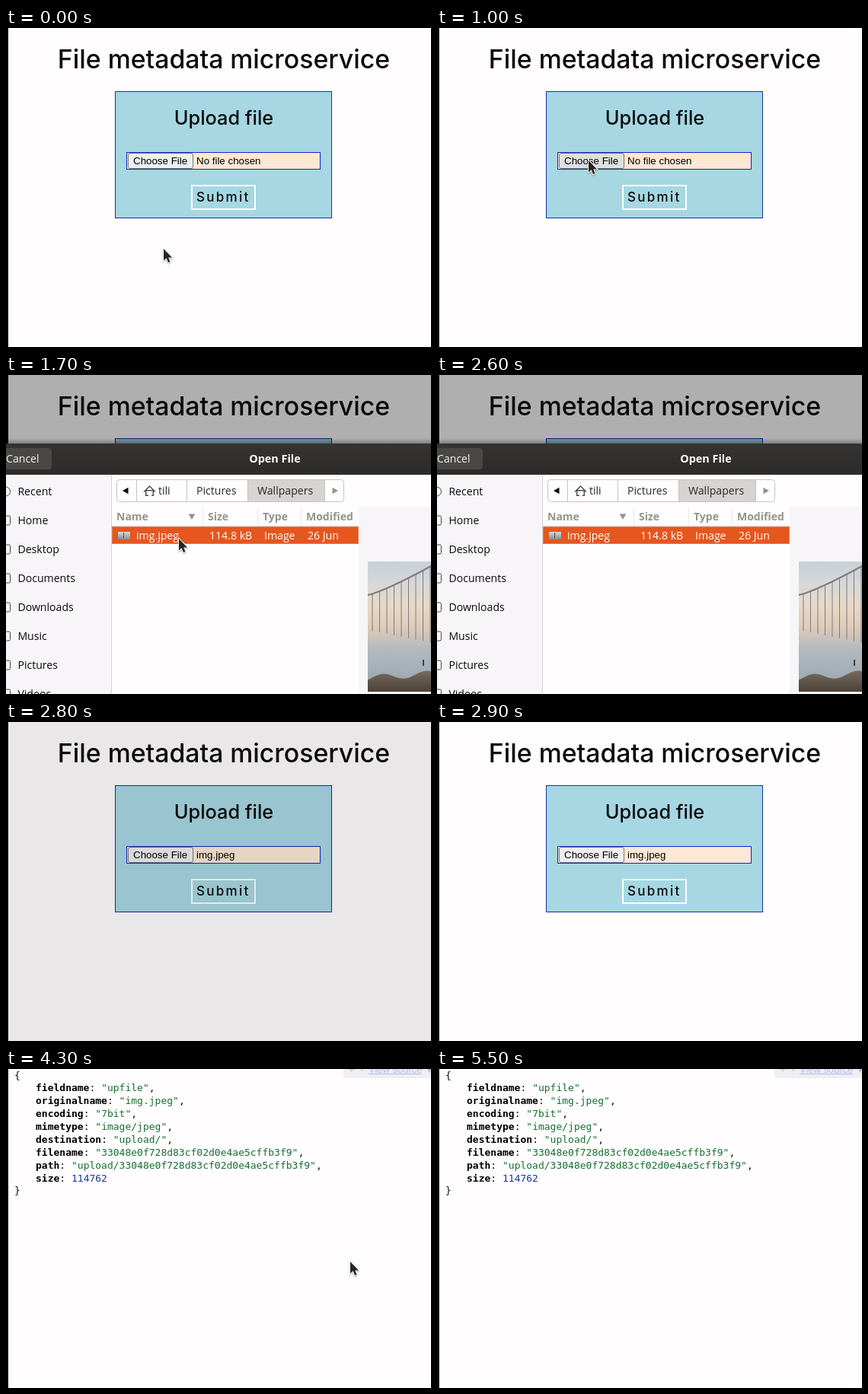
These frames come from a looping animation (558 by 419 pixels, 5.9 s). An HTML page with a canvas:

```html
<!DOCTYPE html>
<html lang="en">
<head>
<meta charset="utf-8">
<title>File metadata microservice</title>
<style>
html, body { margin: 0; width: 100%; height: 100%; overflow: hidden; background: #fffdfe; }
canvas { display: block; width: 558px; height: 419px; }
</style>
</head>
<body>
<canvas id="stage" width="558" height="419"></canvas>
<script>
const W = 558, H = 419, LOOP = 5900, STEP = 100;
const ctx = document.getElementById('stage').getContext('2d');
const PAPER = '#fffdfe', INK = '#0b0a0d', GREY = '#96928f', LINE = '#c9c3bf', ICON = '#4a4846';
const HEAD = 'Inter, sans-serif';
const UI = '"Open Sans", "Noto Sans", sans-serif';
const BODY = '500 14.1px ' + UI, BOLD = '700 14px ' + UI;
const ARIAL = '13.33px "Liberation Sans", Arial, sans-serif';
const MONO = '13px "DejaVu Sans Mono", monospace', CELL = 7.83;

// Pointer moves: start, end, x, y
const MOVES = [
  [100, 500, 192, 187], [600, 800, 199, 174], [1000, 1300, 219, 201],
  [1300, 1700, 227, 215], [1800, 2200, 570, 160], [2900, 3600, 319, 219],
  [3700, 4100, 452, 253], [4900, 5300, 100, 25]
];

const PLACES = ['Recent', 'Home', 'Desktop', 'Documents', 'Downloads', 'Music', 'Pictures', 'Videos'];
const COLUMNS = [
  [145, 'Name', 'img.jpeg'], [265, 'Size', '114.8 kB'],
  [337, 'Type', 'Image'], [394, 'Modified', '26 Jun']
];
const CRUMBS = [[171, 'tili'], [237, 'Pictures'], [317, 'Wallpapers'], [418, '']];

const HASH = '33048e0f728d83cf02d0e4ae5cffb3f9';
const RESULT = {
  fieldname: 'upfile', originalname: 'img.jpeg', encoding: '7bit', mimetype: 'image/jpeg',
  destination: 'upload/', filename: HASH, path: 'upload/' + HASH, size: 114762
};

const ramp = (t, a, b) => Math.min(1, Math.max(0, (t - a) / (b - a)));
const smooth = u => u * u * (3 - 2 * u);

function rect(x, y, w, h, fill) {
  ctx.fillStyle = fill;
  ctx.fillRect(x, y, w, h);
}

function frame(x, y, w, h, color, lw = 1) {
  ctx.strokeStyle = color;
  ctx.lineWidth = lw;
  ctx.strokeRect(x + lw / 2, y + lw / 2, w - lw, h - lw);
}

function round(x, y, w, h, r, fill, stroke) {
  ctx.beginPath();
  ctx.roundRect(x, y, w, h, r);
  if (fill) { ctx.fillStyle = fill; ctx.fill(); }
  if (stroke) { ctx.strokeStyle = stroke; ctx.lineWidth = 1; ctx.stroke(); }
}

function text(s, x, y, font, color, align = 'left') {
  ctx.font = font;
  ctx.fillStyle = color;
  ctx.textAlign = align;
  ctx.fillText(s, x, y);
}

function curve(x0, x1, step, f) {
  ctx.beginPath();
  for (let x = x0; x <= x1; x += step) ctx.lineTo(x, f(x));
}

function triangle(x, y, turn, color) {
  ctx.beginPath();
  for (let i = 0; i < 3; i++) {
    const a = turn + i * Math.PI * 2 / 3;
    ctx.lineTo(x + 5 * Math.cos(a), y + 5 * Math.sin(a));
  }
  ctx.fillStyle = color;
  ctx.fill();
}

function gradient(y0, y1, ...colors) {
  const g = ctx.createLinearGradient(0, y0, 0, y1);
  colors.forEach((c, i) => g.addColorStop(i / (colors.length - 1), c));
  return g;
}

function drawForm(t) {
  text('File metadata microservice', 286, 53, '500 33.8px ' + HEAD, INK, 'center');
  rect(143, 83, 285, 167, '#a6d7e2');
  frame(143, 83, 285, 167, '#1430ac');
  text('Upload file', 286, 127, '500 25.3px ' + HEAD, INK, 'center');

  rect(158, 163, 255, 23, '#fce8d5');
  frame(158, 163, 255, 23, '#1426c0');
  const over = t >= 700 && t < 1200;
  round(160.5, 164.5, 85, 20, 2.5, over ? '#dfdfdf' : '#efefef', '#767676');
  text('Choose File', 167, 179, ARIAL, '#000');
  text(t < 2700 ? 'No file chosen' : 'img.jpeg', 250, 179, ARIAL, '#000');

  const hover = ramp(t, 3500, 3615) - ramp(t, 3700, 3900);
  rect(243, 206, 85, 33, `rgba(255,253,254,${hover})`);
  frame(243, 206, 85, 33, PAPER, 2);
  ctx.letterSpacing = '2.3px';
  text('Submit', 250, 228, '500 17px ' + HEAD, hover > 0.4 ? '#1878aa' : INK);
  ctx.letterSpacing = '0px';
}

function drawPhoto() {
  const x = 475, y = 245, w = W - x, h = 171;
  const cable = px => 289 - 38 * Math.pow((px - x) / w, 1.2);
  ctx.save();
  ctx.beginPath();
  ctx.rect(x, y, w, h);
  ctx.clip();
  rect(x, y, w, h, gradient(y, y + h,
    '#c6d0d8', '#d6d8d9', '#e8d9c8', '#dfcbb8', '#b3bac0', '#a4afb7', '#98a2a9'));
  ctx.strokeStyle = '#86797a';
  ctx.lineWidth = 1;
  for (let px = x + 6; px < W; px += 9.5) {
    ctx.beginPath();
    ctx.moveTo(px, cable(px));
    ctx.lineTo(px, 335 + (px - x) * 0.2);
    ctx.stroke();
  }
  curve(x, W + 4, 4, cable);
  ctx.lineWidth = 2.2;
  ctx.stroke();
  curve(x, W + 4, 3, px => 398 + 4 * Math.sin(px / 9) - (px - x) * 0.07);
  ctx.lineTo(W, H);
  ctx.lineTo(x, H);
  ctx.fillStyle = gradient(390, 416, '#75695d', '#4b4138');
  ctx.fill();
  rect(547, 374, 2, 8, '#3d4247');
  ctx.restore();
}

function drawSidebar() {
  rect(0, 131, 138, H, '#f7f5f7');
  rect(138, 131, 1, H, '#d6d1ce');
  PLACES.forEach((name, i) => {
    const y = 153 + 38 * i;
    round(-8, y - 6, 13.5, 12, i ? 1.5 : 6, null, ICON);
    text(name, 15.4, y + 5, BODY, INK);
  });
}

function drawCrumbs() {
  round(145.5, 137.5, 298, 29, 4, PAPER, LINE);
  rect(317, 138, 101, 28, '#d7d3d3');
  CRUMBS.forEach(([x, name], i) => {
    rect(x, 138, 1, 28, LINE);
    text(name, x + (i ? 13 : 29), 157, BODY, '#2a2928');
  });
  triangle(158, 152, Math.PI, INK);
  triangle(431, 152, 0, GREY);

  // home symbol
  curve(181, 196, 7.5, x => 146 + Math.abs(x - 188.5));
  ctx.strokeStyle = ICON;
  ctx.lineWidth = 1.4;
  ctx.stroke();
  frame(183, 151, 11, 8, ICON, 1.4);
  rect(187, 154, 4, 5, PAPER);
}

function drawFiles() {
  rect(139, 198, 324, 1, '#dedad8');
  rect(139, 199, 324, 23, '#e6561f');
  frame(139, 199, 324, 23, 'rgba(255,255,255,.22)');
  rect(147, 206, 16, 10, gradient(206, 216, '#d9dadb', '#7f8b93'));
  rect(154, 207, 1, 7, ICON);
  COLUMNS.forEach(([x, head, cell], i) => {
    text(head, x, 191, BOLD, GREY);
    if (i) rect(x - 7, 174, 1, 24, '#ece8e7');
    text(cell, x + (i ? 2 : 26), 216, BODY, '#fff');
  });
  triangle(244, 185, Math.PI / 2, GREY);
}

function drawDialog() {
  rect(0, 83, W, 8, gradient(83, 91, 'rgba(0,0,0,0)', 'rgba(0,0,0,.3)'));
  rect(0, 90, W, 41, gradient(90, 131, '#353432', '#2c2b29'));
  round(-8, 96, 68, 28, 4, '#494844');
  text('Cancel', 0, 115, BODY, '#f4f2ee');
  text('Open File', 353, 115, '700 14.4px ' + UI, '#fff', 'center');
  rect(0, 131, W, H, PAPER);
  drawSidebar();
  drawCrumbs();
  drawFiles();
  rect(463, 173, 95, H, '#f7f5f7');
  drawPhoto();
}

function drawResult() {
  text('{', 11, 13, MONO, INK);
  Object.entries(RESULT).forEach(([key, value], i) => {
    const y = 29 + 17 * i, isText = typeof value === 'string';
    const shown = JSON.stringify(value);
    const x = 39 + (key.length + 2) * CELL;
    text(key, 39, y, 'bold ' + MONO, '#000');
    text(':', x - 2 * CELL, y, MONO, INK);
    text(shown, x, y, MONO, isText ? '#14702f' : '#1c349c');
    if (isText) text(',', x + shown.length * CELL, y, MONO, INK);
  });
  text('}', 11, 164, MONO, INK);

  round(443, -10, 125, 22, 4, '#efeef3');
  text('+  -', 450, 5, ARIAL, '#b4bad2');
  text('View source', 476, 5, '13px "Liberation Sans", Arial, sans-serif', '#aebcf0');
  rect(476, 6, 70, 1, '#aebcf0');
  triangle(556, 0, Math.PI / 2, '#b9bccb');
}

function drawArrow() {
  const p = new Path2D('M0 0V15.5L3.6 12.3 6 18 8.6 17 6.2 11.4H11Z');
  ctx.shadowColor = 'rgba(0,0,0,.35)';
  ctx.shadowBlur = 2;
  ctx.shadowOffsetY = 1;
  outline(p, '#fff', '#262527', 1.8);
}

function drawHand() {
  const p = new Path2D();
  p.roundRect(-1.6, 0, 3.4, 12, 1.7);
  p.roundRect(-1.6, 6, 12.6, 11.5, 4);
  p.ellipse(-1.4, 11.4, 4.2, 1.8, 0.8, 0, Math.PI * 2);
  outline(p, '#1d1c1e', '#fff', 2);
  for (let x = 2; x < 8; x += 2.8) rect(x, 11, 0.9, 4, ICON);
}

function drawBeam() {
  const p = new Path2D('M-3 -8H3M0 -8V9M-3 9H3');
  for (const [color, lw] of [['#fff', 3], ['#262527', 1.2]]) {
    ctx.strokeStyle = color;
    ctx.lineWidth = lw;
    ctx.stroke(p);
  }
}

function outline(path, edge, fill, lw) {
  ctx.strokeStyle = edge;
  ctx.lineWidth = lw;
  ctx.stroke(path);
  ctx.shadowColor = 'transparent';
  ctx.fillStyle = fill;
  ctx.fill(path);
}

function drawPointer(t) {
  if (t >= 5500) return;
  let x = 207, y = 290;
  for (const [start, end, toX, toY] of MOVES) {
    const k = smooth(ramp(t, start, end));
    x += (toX - x) * k;
    y += (toY - y) * k;
  }
  ctx.save();
  ctx.translate(x, y);
  if (t >= 5300) drawBeam();
  else if (t >= 3600 && t < 3800) drawHand();
  else drawArrow();
  ctx.restore();
}

function draw(t) {
  rect(0, 0, W, H, PAPER);
  if (t < 4300) drawForm(t);
  else drawResult();
  const dim = 0.31 * (ramp(t, 1000, 1465) - ramp(t, 2600, 2878));
  rect(0, 0, W, H, `rgba(0,0,0,${dim})`);
  rect(0, 0, 3, H, '#000');
  if (t >= 1200 && t < 2700) drawDialog();
  drawPointer(t);
}

function tick(now) {
  draw(Math.floor(now % LOOP / STEP) * STEP);
  requestAnimationFrame(tick);
}
draw(0);
requestAnimationFrame(tick);
</script>
</body>
</html>
```
